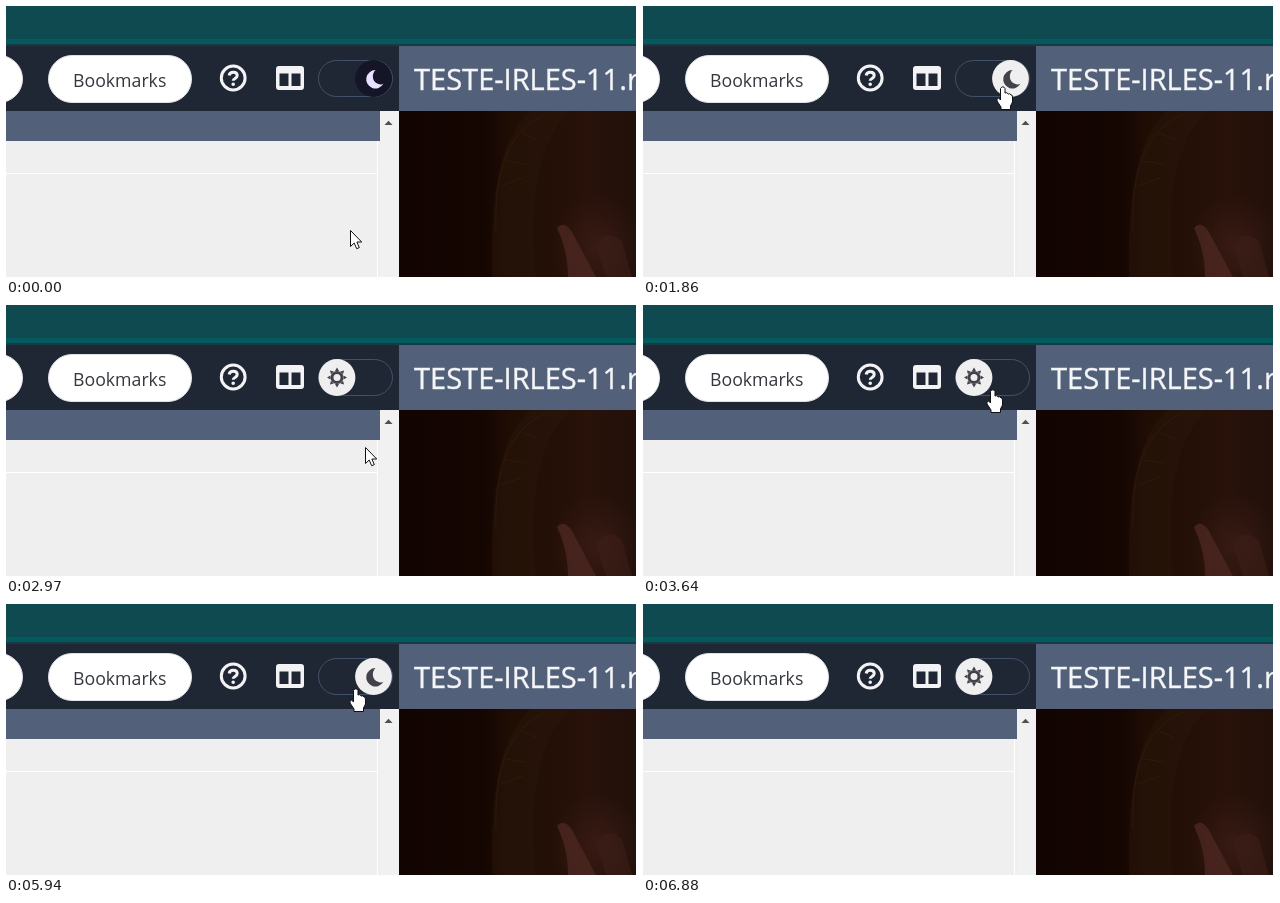
Animation of 631 by 271 pixels, one loop 7340 ms. Source, as an HTML page:

```html
<!DOCTYPE html>
<html lang="en">
<head>
<meta charset="utf-8">
<title>Theme switch</title>
<style>
  html, body { margin: 0; width: 100%; height: 100%; overflow: hidden; background: #efefef; }
  svg { display: block; width: 631px; height: 271px; }
  text { font-family: "Open Sans", "Noto Sans", sans-serif; }
</style>
</head>
<body>
<svg viewBox="0 0 631 271">
  <defs>
    <linearGradient id="shade">
      <stop offset="0" stop-color="#120401"/>
      <stop offset=".36" stop-color="#150602"/>
      <stop offset=".46" stop-color="#1f0d04"/>
      <stop offset=".8" stop-color="#28120a"/>
      <stop offset="1" stop-color="#22100a"/>
    </linearGradient>
    <radialGradient id="glow">
      <stop offset="0" stop-color="#42201a"/>
      <stop offset="1" stop-color="#42201a" stop-opacity="0"/>
    </radialGradient>
    <clipPath id="photoArea"><path d="M393 105H630V271H393Z"/></clipPath>
  </defs>

  <!-- window top and toolbar -->
  <rect width="631" height="33" fill="#0e4a50"/>
  <rect y="33" width="631" height="5" fill="#035b5f"/>
  <rect y="38" width="631" height="2" fill="#173a43"/>
  <rect y="40" width="393" height="65" fill="#202734"/>
  <g fill="#fff" stroke="#dfe1e5">
    <rect x="-60" y="49.5" width="76.5" height="47" rx="23.5"/>
    <rect x="42.5" y="49.5" width="143" height="47" rx="23.5"/>
  </g>
  <text x="67" y="81" font-size="17.7" fill="#34383e">Bookmarks</text>

  <g fill="none" stroke="#f3f3f5" stroke-width="3">
    <circle cx="227.2" cy="72" r="11.9"/>
    <path d="M223.2 69.5c.5-4.5 8-4.3 8 .1 0 3-4 2.700-4 5.2"/>
    <circle cx="227.2" cy="78.2" r=".9" stroke-width="1.8"/>
  </g>
  <path fill="#f3f3f5" fill-rule="evenodd"
    d="M273 60H295q3 0 3 3V81q0 3-3 3H273q-3 0-3-3V63q0-3 3-3ZM273.500 67.500V80H282.500V67.500ZM285.500 67.500V80H294.500V67.500Z"/>

  <!-- document panel -->
  <rect y="105" width="393" height="166" fill="#efefef"/>
  <rect y="105" width="374" height="30" fill="#526079"/>
  <path d="M0 167.5H371.5M371.5 135V271" stroke="#fff" fill="none"/>
  <rect x="374" y="105" width="19" height="166" fill="#f1f1f1"/>
  <path d="M378.500 119L382.500 114.800 386.500 119Z" fill="#505050"/>

  <!-- title and dim photograph -->
  <rect x="393" y="40" width="237" height="65" fill="#526079"/>
  <text x="408" y="84" font-size="29" fill="#f4f5f7" stroke="#f4f5f7" stroke-width=".4">TESTE-IRLES-11.r</text>
  <g clip-path="url(#photoArea)">
    <rect x="393" y="105" width="237" height="166" fill="url(#shade)"/>
    <path d="M486 271C484 190 494 130 525 105H565C535 130 522 190 530 271Z" fill="#2b170a" opacity=".5"/>
    <g fill="none" stroke="#38210f" opacity=".55">
      <path d="M490 225C488 165 502 125 540 108"/>
      <path d="M495 180l22-8M500 155l20 3M516 127l16 7"/>
    </g>
    <ellipse cx="592" cy="240" rx="46" ry="52" fill="url(#glow)" opacity=".6"/>
    <path d="M551 222Q558 214 566 226L590 271H562Q562 245 551 222Z" fill="#4a2620" opacity=".85"/>
    <path d="M590 240Q600 222 616 235L626 271H600Z" fill="#3d1e18" opacity=".6"/>
  </g>
  <rect x="630" width="1" height="271" fill="#fff"/>

  <!-- switch -->
  <rect x="312.5" y="54.5" width="74" height="36" rx="18" fill="#202734" stroke="#42506a"/>
  <g id="knob">
    <circle id="disc" r="18.4"/>
    <path id="moon" transform="translate(.7 .3) scale(.92)"
      d="M1.500-9.500A10 10 0 1 0 10 5.500Q7 7 4 5.500C-2.500 3-3-5.500 1.500-9.500Z"/>
    <g id="sun">
      <circle r="5" fill="none" stroke="currentColor" stroke-width="3"/>
      <g id="rays"></g>
    </g>
  </g>

  <!-- pointer -->
  <g id="pointer" fill="#fff" stroke="#111" stroke-linejoin="round">
    <path id="arrow" d="M.5.5V16.500L4.200 13 6.700 18.700 9.300 17.600 6.900 12H11.700Z"/>
    <path id="hand" d="M-2.500 1.500Q0-2 2 1.500V6Q4 4.800 5.200 7 7 6 8 8 9.500 7.600 9.500 10V15L7.500 19V22.500H-2V20L-6 14Q-6.500 10.800-4.500 11L-2.500 13Z"/>
  </g>
</svg>

<script>
const DURATION = 7340;
const SLIDE = 370;
const LEFT = 331, RIGHT = 367.5;
const CLICKS = [1860, 3820, 5940];
const EXIT = 6880;

const el = id => document.getElementById(id);
const clamp = v => Math.min(1, Math.max(0, v));
const mix = (a, b, p) => a + (b - a) * p;

const steady = p => p;
const soft = p => (1 - Math.cos(Math.PI * p)) / 2;
const speedUp = p => p * p;
const slowDown = p => 1 - (1 - p) ** 1.3;
const snappy = p => soft(p ** 0.6);

const home = { x: 344, y: 224 };
const moves = [
  { start: 150, end: 880, x: 364, y: 88, ease: soft },
  { start: 880, end: 1020, x: 360, y: 81, ease: soft },
  { start: 2040, end: 2360, x: 361, y: 177, ease: soft },
  { start: 2700, end: 3430, x: 357, y: 100, ease: slowDown },
  { start: 3430, end: 3640, x: 350, y: 85, ease: soft },
  { start: 6060, end: 6650, x: 452, y: 240, ease: speedUp },
  { start: 6650, end: EXIT, x: 524, y: 275, ease: steady }
];

el("rays").innerHTML = Array.from({ length: 8 }, (_, i) =>
  `<path d="M-2-6.500L0-10 2-6.500Z" fill="currentColor" transform="rotate(${i * 45})"/>`).join("");

function pointerAt(t) {
  return moves.reduce((from, { start, end, x, y, ease }) => {
    const p = ease(clamp((t - start) / (end - start)));
    return { x: mix(from.x, x, p), y: mix(from.y, y, p) };
  }, home);
}

function draw(t) {
  // Each click flips the colours at once and starts a slide the other way.
  const light = CLICKS.filter(click => t >= click).length % 2 === 1;
  const sunny = CLICKS.reduce((sum, click, i) =>
    sum + (-1) ** i * snappy(clamp((t - click - 15) / SLIDE)), 0);
  el("knob").setAttribute("transform", `translate(${mix(RIGHT, LEFT, sunny)} 72.5)`);
  el("knob").setAttribute("color", light ? "#41424a" : "#e8e1ff");
  el("disc").setAttribute("fill", light ? "#efefef" : "#141526");
  el("moon").setAttribute("fill", "currentColor");
  el("moon").setAttribute("opacity", 1 - sunny);
  el("sun").setAttribute("opacity", sunny);

  const { x, y } = pointerAt(t);
  const over = y < 102 && x > 312 && x < 387;
  el("pointer").setAttribute("transform", `translate(${Math.round(x)} ${Math.round(y)})`);
  el("pointer").setAttribute("visibility", t < EXIT ? "visible" : "hidden");
  el("arrow").setAttribute("display", over ? "none" : "inline");
  el("hand").setAttribute("display", over ? "inline" : "none");
}

const begin = performance.now();
function tick() {
  draw((performance.now() - begin) % DURATION);
  requestAnimationFrame(tick);
}
tick();
</script>
</body>
</html>
```
